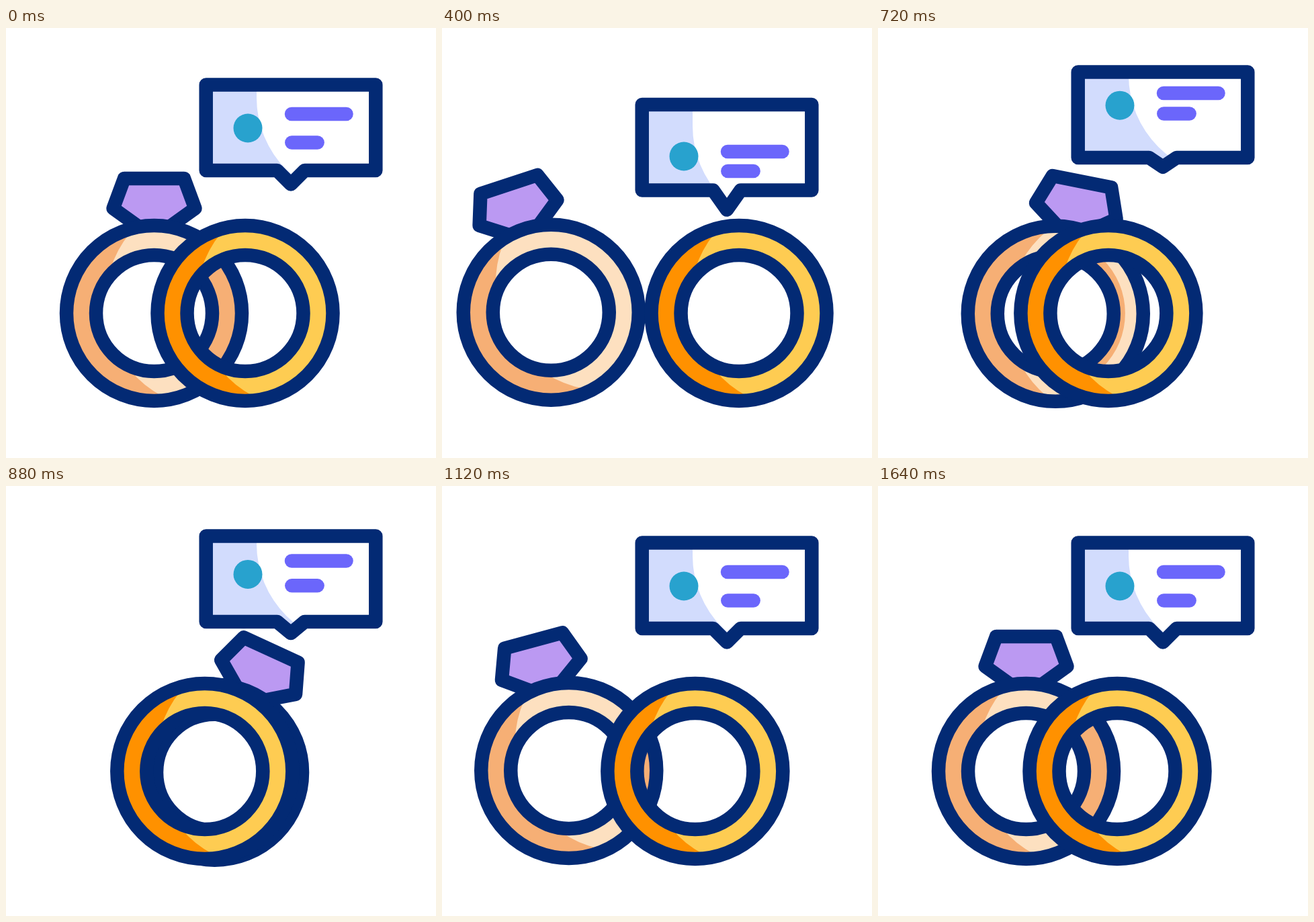
An HTML page with a canvas that plays this animation: 640x640 px, repeating every 2 s.

```html
<!DOCTYPE html>
<html lang="en">
<head>
<meta charset="utf-8">
<title>Wedding rings</title>
<style>
  html, body { margin: 0; width: 100%; height: 100%; overflow: hidden; background: #fff; }
  canvas { display: block; width: 100%; height: 100%; }
</style>
</head>
<body>
<canvas id="stage" width="640" height="640"></canvas>
<script>
const ctx = document.getElementById('stage').getContext('2d');
const LOOP = 2000, STEP = 40, LINE = 20.5, TAU = Math.PI * 2;
const NAVY = '#032a74';
const OUTER = 130.5, INNER = 86.5, RING_Y = 424.5;

const RING_TIMES = [80, 480, 860, 1127, 1620];
const BUBBLE_TIMES = [40, 480, 752, 1000];

// Eased interpolation through keyed values, at rest at every key.
function tween(t, times, values) {
  if (t <= times[0]) return values[0];
  for (let i = 1; i < times.length; i++) {
    if (t < times[i]) {
      const u = (t - times[i - 1]) / (times[i] - times[i - 1]);
      return values[i - 1] + (values[i] - values[i - 1]) * u * u * (3 - 2 * u);
    }
  }
  return values[values.length - 1];
}

function disc(x, y, r) {
  const path = new Path2D();
  path.arc(x, y, r, 0, TAU);
  return path;
}

function polygon(points) {
  const path = new Path2D();
  points.forEach(([x, y]) => path.lineTo(x, y));
  path.closePath();
  return path;
}

const band = new Path2D();
band.addPath(disc(0, 0, OUTER));
band.addPath(disc(0, 0, INNER));

const gem = polygon([
  [-44.5, -200.5], [44.5, -200.5], [61, -156],
  [22, -128], [-22, -128], [-61, -156]
]);

function fill(path, color, rule) {
  ctx.fillStyle = color;
  ctx.fill(path, rule || 'nonzero');
}

function outline(path, color = NAVY) {
  ctx.strokeStyle = color;
  ctx.stroke(path);
}

function scoped(draw) {
  ctx.save();
  draw();
  ctx.restore();
}

function ringBody(shade, light) {
  fill(band, shade, 'evenodd');
  scoped(() => {
    ctx.clip(band, 'evenodd');
    fill(disc(87.5, -17.5, 160), light);
  });
}

function ringOutline() {
  outline(disc(0, 0, OUTER));
  outline(disc(0, 0, INNER));
}

function rings(t) {
  const leftX = 220.5 + tween(t, RING_TIMES, [0, -65, 92, -32, 0]);
  const rightX = 356 + tween(t, RING_TIMES, [0, 96, -61.5, 21, 0]);
  const turn = tween(t, RING_TIMES, [0, -20.3, 25.3, -15.3, 0]) * Math.PI / 180;

  scoped(() => {
    const y = RING_Y + 4 * Math.sin(turn);
    ctx.translate(leftX, y);
    scoped(() => {
      ctx.rotate(turn);
      fill(gem, '#bb99f2');
      outline(gem);
      ringBody('#f6af75', '#fde0c0');
    });
    // Shadow on the part seen through the right ring.
    scoped(() => {
      ctx.clip(band, 'evenodd');
      ctx.clip(disc(rightX - leftX, RING_Y - y, INNER));
      fill(disc(rightX - leftX - 89, RING_Y - y, 114), '#f6af75');
    });
    ringOutline();
  });

  scoped(() => {
    ctx.translate(rightX, RING_Y);
    ringBody('#ff9100', '#fecc52');
    ringOutline();
  });
}

function bar(x1, x2, y) {
  const path = new Path2D();
  path.moveTo(x1, y);
  path.lineTo(x2, y);
  outline(path, '#6b66fb');
}

function bubble(t) {
  const shift = (down, up) => tween(t, BUBBLE_TIMES, [0, down, up, 0]);
  const dy = shift(32.3, -21);
  const tip = 232.6 + shift(41.6, -28.5);
  const inner = shift(46, -37);
  const top = 84.5 + dy, bottom = 212 + dy;

  const frame = polygon([
    [297.7, top], [550.3, top], [550.3, bottom], [444.5, bottom],
    [424, tip], [403.5, bottom], [297.7, bottom]
  ]);
  const shade = new Path2D();
  shade.moveTo(280, 0);
  shade.lineTo(373, 0);
  shade.lineTo(373, 104 + inner);
  shade.arc(524, 104 + inner, 151, Math.PI, Math.PI / 2, true);
  shade.lineTo(280, 255 + inner);

  fill(frame, '#fff');
  scoped(() => {
    ctx.clip(frame);
    fill(shade, '#d2dcfd');
  });
  outline(frame);
  fill(disc(360, 149 + inner, 21.5), '#28a2ce');
  bar(425, 506.5, 128 + shift(61.3, -34.6));
  bar(425.3, 463.6, 170.5 + shift(46.5, -46.5));
}

function render(now) {
  const t = Math.floor((now % LOOP) / STEP) * STEP;
  fill(polygon([[0, 0], [640, 0], [640, 640], [0, 640]]), '#fff');
  ctx.lineWidth = LINE;
  ctx.lineJoin = ctx.lineCap = 'round';
  bubble(t);
  rings(t);
}

const start = performance.now();
function tick() {
  render(performance.now() - start);
  requestAnimationFrame(tick);
}
tick();
</script>
</body>
</html>
```
